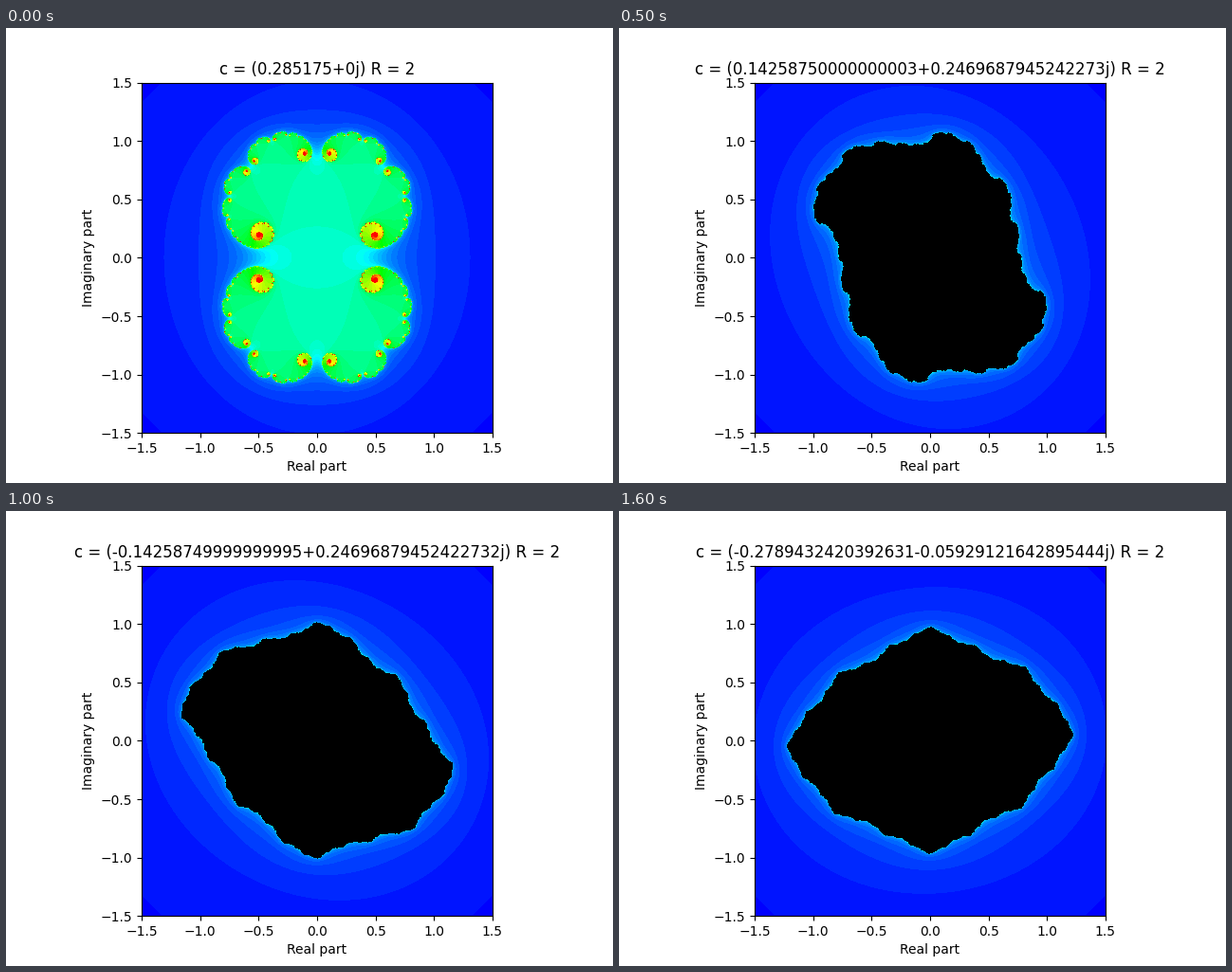
A matplotlib script that plays this animation: 640x480 px, repeating every 1700 ms.

```python
import math

import matplotlib.pyplot as plt
import numpy as np
from matplotlib.animation import FuncAnimation
from matplotlib.colors import hsv_to_rgb

FRAMES = 17
INTERVAL = 100
SIZE = 370
LIMIT = 1.5
RADIUS = 2
MAX_ITER = 150
HUE_SPAN = 50
C_RADIUS = 0.285175


def constant(step):
    """Walk around a circle in steps of 12 degrees."""
    angle = 2 * math.pi * step / 30
    return complex(C_RADIUS * math.cos(angle), C_RADIUS * math.sin(angle))


def escape_counts(c):
    axis = (np.arange(SIZE) + 0.5) / SIZE * 2 * LIMIT - LIMIT
    z = (axis[None, :] + 1j * axis[:, None]).ravel()
    counts = np.full(z.size, MAX_ITER)
    active = np.arange(z.size)
    for n in range(MAX_ITER):
        outside = z.real**2 + z.imag**2 > RADIUS**2
        if outside.any():
            counts[active[outside]] = n
            active, z = active[~outside], z[~outside]
        z = z * z + c
    return counts.reshape(SIZE, SIZE)


def build_palette():
    """Blue to red by escape count, black for points that stay."""
    hue = 2 / 3 * (1 - np.minimum(np.arange(MAX_ITER + 1) / HUE_SPAN, 1))
    hsv = np.stack([hue, np.ones_like(hue), np.ones_like(hue)], axis=1)
    hsv[-1, 2] = 0
    return hsv_to_rgb(hsv)


palette = build_palette()

fig, ax = plt.subplots(figsize=(6.4, 4.8), dpi=100)
image = ax.imshow(
    np.zeros((SIZE, SIZE, 3)),
    origin="lower",
    extent=(-LIMIT, LIMIT, -LIMIT, LIMIT),
    interpolation="nearest",
)
ax.set_xlabel("Real part")
ax.set_ylabel("Imaginary part")
title = ax.set_title("")


def update(step):
    c = constant(step)
    image.set_data(palette[escape_counts(c)])
    title.set_text(f"c = {c} R = {RADIUS}")
    return image, title


anim = FuncAnimation(fig, update, frames=FRAMES, interval=INTERVAL,
                     repeat=True, repeat_delay=0, blit=False)
plt.show()
```
